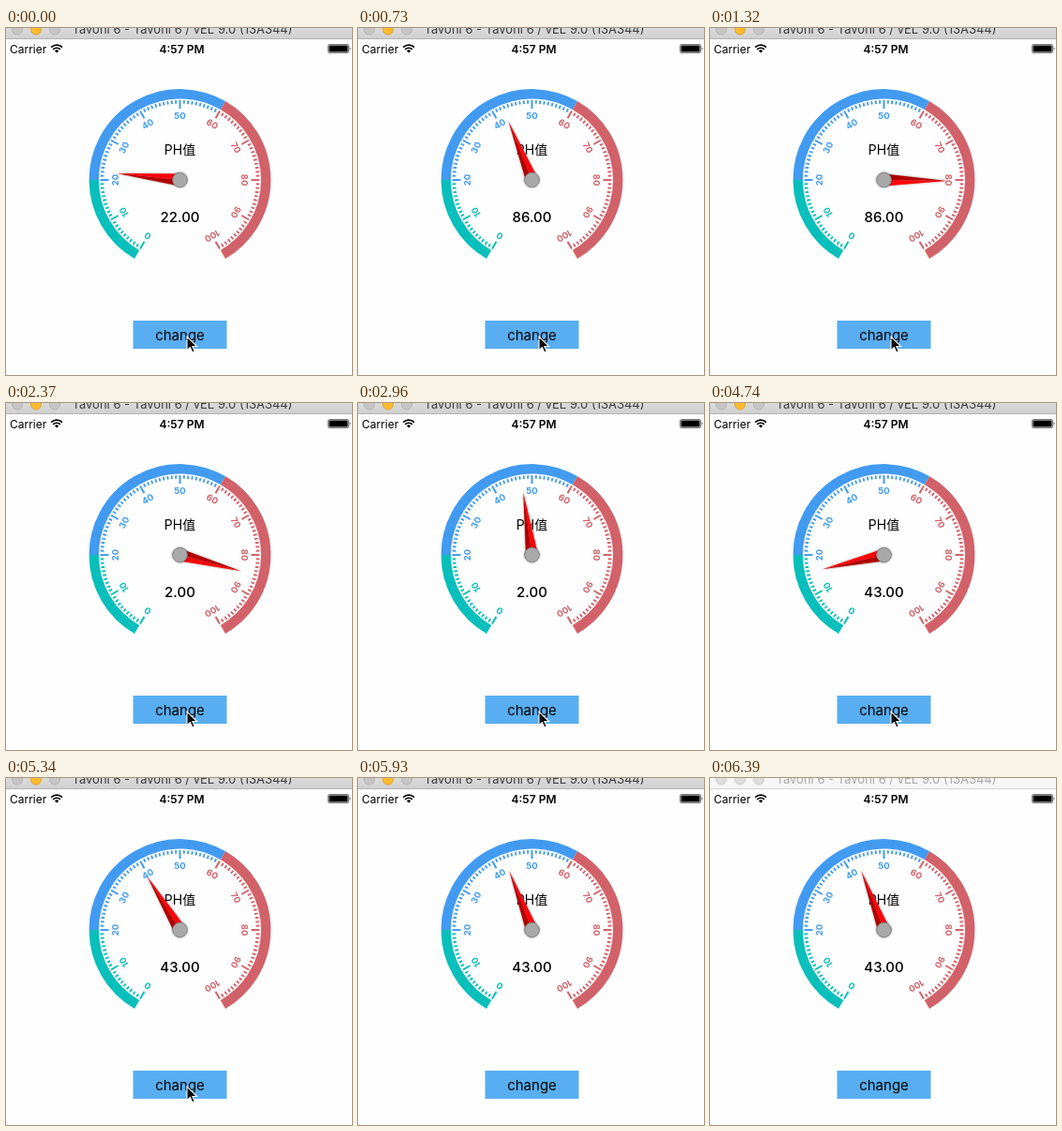
An HTML page for the animation above (6.44 s loop, 369 px wide and 370 px high).

```html
<!DOCTYPE html>
<html lang="en">
<head>
<meta charset="utf-8">
<title>PH gauge</title>
<style>
  html, body { margin: 0; width: 100%; height: 100%; overflow: hidden; background: #fefefe; }
  svg { display: block; width: 369px; height: 370px; font-family: Inter, "Noto Sans CJK SC", "Noto Sans CJK", sans-serif; }
  text { text-anchor: middle; }
</style>
</head>
<body>
<svg id="stage" viewBox="0 0 369 370">
  <defs>
    <linearGradient id="chrome" x2="0" y2="1">
      <stop stop-color="#dadada"/><stop offset="1" stop-color="#d0d0d0"/>
    </linearGradient>
    <filter id="shadow" x="-30%" y="-80%" width="160%" height="260%">
      <feDropShadow dx="0" dy="0" stdDeviation="1.2" flood-color="#000" flood-opacity=".45"/>
    </filter>
  </defs>

  <rect id="bar" width="369" height="11"/>
  <rect id="barEdge" y="11" width="369" height="1"/>
  <g id="lights" stroke-width="1">
    <circle cx="12" cy="1.5" r="5.5"/><circle cx="32" cy="1.5" r="5.5"/><circle cx="52" cy="1.5" r="5.5"/>
  </g>
  <text id="title" x="188" y="6" font-size="13">Tavoni 6 - Tavoni 6 / vEL 9.0 (13A344)</text>

  <text x="4" y="27" font-size="12" style="text-anchor:start">Carrier</text>
  <g fill="none" stroke="#000" stroke-width="1.7">
    <path d="M48.2 20.6a8.4 8.4 0 0 1 11.8 0M50.3 22.8a5.4 5.4 0 0 1 7.6 0"/>
    <path d="M54.1 26.6l-2.1-2.2a3 3 0 0 1 4.2 0z" fill="#000" stroke="none"/>
  </g>
  <text x="187.5" y="27" font-size="12" font-weight="600">4:57 PM</text>
  <rect x="343.5" y="17.5" width="22" height="9" rx="1.5" fill="#fff" stroke="#777"/>
  <rect x="344.5" y="18.5" width="20" height="7" rx=".5"/>
  <path d="M366.7 20.3q1.6 1.7 0 3.4z"/>

  <g id="dial" transform="translate(185.5 162)"></g>
  <text x="185.5" y="135" font-size="14">PH值</text>
  <text id="reading" x="185.5" y="207" font-size="15" font-weight="500"></text>

  <g transform="translate(185.5 162)">
    <g filter="url(#shadow)">
      <g id="needle">
        <path d="M0-6.5L67.5 0H0z" fill="#b00006"/>
        <path d="M0 6.5L67.5 0H0z" fill="#fb0007"/>
      </g>
    </g>
    <circle r="7.8" fill="#a9a9a9" stroke="#858585" filter="url(#shadow)"/>
  </g>

  <rect x="135.5" y="312" width="100" height="30" fill="#58aef0"/>
  <text x="185.5" y="332.5" font-size="15">change</text>
  <path id="cursor" d="M0 0V14.6L3.4 11.4 5.7 16.8 8.2 15.7 5.9 10.5H10.6z" stroke="#fff" stroke-width="1.1"/>
</svg>
<script>
const LOOP = 6440, TICK = 148.3, LEAD = 15, MOVE = 1500;
const BLUR_AT = 6390;
const moves = [
  { start: 134, from: 22, to: 86 },
  { start: 2236, from: 86, to: 2 },
  { start: 4130, from: 2, to: 43 }
];
const zones = [
  { from: 0, to: 20, color: '#09bfbb' },
  { from: 20, to: 60, color: '#429bf0' },
  { from: 60, to: 100, color: '#d2626a' }
];
const byId = id => document.getElementById(id);
const set = (node, attrs) => {
  for (const name in attrs) node.setAttribute(name, attrs[name]);
  return node;
};
const add = (tag, attrs) =>
  byId('dial').appendChild(set(document.createElementNS('http://www.w3.org/2000/svg', tag), attrs));

const angleOf = value => 120 + value * 3;
const point = (value, r) => {
  const a = angleOf(value) * Math.PI / 180;
  return `${r * Math.cos(a)} ${r * Math.sin(a)}`;
};

function buildDial() {
  for (const { from, to, color } of zones)
    add('path', {
      d: `M${point(from, 91.7)}A91.7 91.7 0 0 1 ${point(to, 91.7)}`,
      fill: 'none', stroke: color, 'stroke-width': 10.4
    });
  for (let v = 0; v <= 100; v++) {
    const { color } = zones.findLast(zone => v >= zone.from);
    const major = v % 10 === 0;
    add('path', {
      d: `M${point(v, major ? 76 : 81.3)}L${point(v, 85)}`,
      stroke: color, 'stroke-width': major ? 2 : 1.9
    });
    if (major)
      add('text', {
        transform: `rotate(${angleOf(v) + 90})`, y: -65.5,
        'font-size': 9.5, 'font-weight': 700, fill: color
      }).textContent = v;
  }
}

// Ease-in-out: cubic Bézier (.42, 0, .58, 1), solved by bisection.
function ease(x) {
  if (x <= 0) return 0;
  if (x >= 1) return 1;
  let lo = 0, hi = 1;
  for (let i = 0; i < 24; i++) {
    const s = (lo + hi) / 2, q = 1 - s;
    if (1.26 * s * q * q + 1.74 * s * s * q + s ** 3 < x) lo = s;
    else hi = s;
  }
  return lo * lo * (3 - 2 * lo);
}

function drawWindow(active) {
  set(byId('bar'), { fill: active ? 'url(#chrome)' : '#f6f6f6' });
  set(byId('barEdge'), { fill: active ? '#b4b4b4' : '#d4d4d4' });
  set(byId('title'), { fill: active ? '#3c3c3c' : '#a9a9a9' });
  [...byId('lights').children].forEach((light, i) => {
    const lit = active && i === 1;
    set(light, {
      fill: lit ? '#fdbc2f' : active ? '#c6c6c6' : '#dcdcdc',
      stroke: lit ? '#e0a032' : active ? '#b3b3b3' : '#cfcfcf'
    });
  });
}

function render(time) {
  // The screen refreshes at a slow, fixed rate.
  const t = Math.max(0, Math.floor((time + LEAD) / TICK) * TICK - LEAD);
  const move = moves.findLast(m => t >= m.start);
  const target = move ? move.to : moves[0].from;
  const value = move ? move.from + (move.to - move.from) * ease((t - move.start) / MOVE) : target;
  set(byId('needle'), { transform: `rotate(${angleOf(value)})` });
  byId('reading').textContent = target.toFixed(2);

  const exit = Math.min(1, Math.max(0, (t - 5400) / 500));
  set(byId('cursor'), { transform: `translate(${193 + 6 * exit} ${329 + 44 * exit ** 2})` });
  drawWindow(time < BLUR_AT);
}

buildDial();
const began = performance.now();
function frame() {
  render((performance.now() - began) % LOOP);
  requestAnimationFrame(frame);
}
frame();
</script>
</body>
</html>
```
